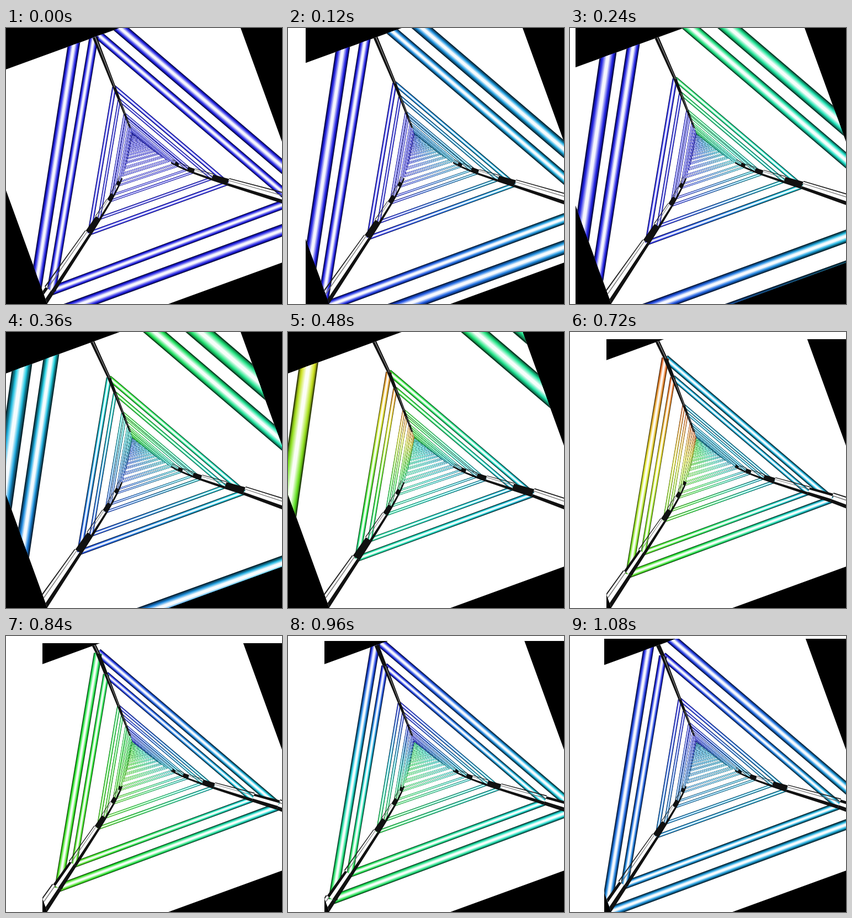
Recreate the animation shown at these times as an HTML page with a canvas. Size 500x500 px, loop 1.2 s.

```html
<!DOCTYPE html>
<html lang="en">
<head>
<meta charset="utf-8">
<title>Triangle tunnel</title>
<style>
html, body { margin: 0; width: 100%; height: 100%; overflow: hidden; background: #fff; }
canvas { display: block; }
</style>
</head>
<body>
<canvas id="stage" width="500" height="500"></canvas>
<script>
const ctx = document.getElementById('stage').getContext('2d');
const STEP = 120, STEPS = 10, PAIRS = 22;
const over = (w, limit) => Math.max(0, w - limit);
const clamp = (v, low, high) => Math.min(high, Math.max(low, v));
const mix = (a, b, t) => a + (b - a) * t;

// Corners as functions of the triangle's width; the far end bends up and left.
function bent(w, x, y) {
  const e = Math.exp(-w / 45);
  return [x - 26 * e, y - 64 * e];
}
const peak = w => bent(w, 246.7 - 0.202 * w - 0.06 * over(w, 430), 236.3 - 0.516 * w);
const right = w => bent(w, 247.3 + 0.617 * w, 234.8 + 0.187 * w + 0.05 * over(w, 430));
const left = w => bent(w, 247.3 - 0.383 * w, 228.4 + 0.575 * w);

// Each corner rests at blue and swings through the spectrum once or twice per loop.
function cornerHues(step) {
  const dip = (center, spread, depth) => 240 - depth * Math.exp(-(((step - center) / spread) ** 4));
  return {
    peakLeft: dip(5.1, 2, 230),
    left: dip(6.2, 2.6, 137),
    right: 182 + 58 * Math.cos(Math.PI * step / 5) ** 8,
    peakRight: dip(3.6, 2.4, 125)
  };
}

function tube(a, b, width, h1, h2) {
  const layer = (scale, factor, add) => {
    const paint = ctx.createLinearGradient(...a, ...b);
    for (let t = 0; t <= 1; t += 0.25) {
      const hue = mix(h1, h2, t);
      const light = 28 + Math.min(19, Math.abs(hue - 190) * 0.38);
      paint.addColorStop(t, `hsl(${hue}, 78%, ${light * factor + add}%)`);
    }
    ctx.strokeStyle = paint;
    ctx.lineWidth = width * scale;
    ctx.beginPath();
    ctx.moveTo(...a);
    ctx.lineTo(...b);
    ctx.stroke();
  };
  // Dark rim, full colour, then a highlight brightening towards the axis.
  layer(1, 0.3, 0);
  layer(0.86, 0.75, 0);
  for (let t = 0; t <= 1; t += 0.2) layer(mix(0.74, 0.2, t), 1 - t, 98 * t);
}

function triangle(w, hues) {
  const t = peak(w), r = right(w), l = left(w);
  const width = Math.max(1.8, 0.028 * w, 0.05 * w - 5);
  const lift = 0.17 * over(w, 385);
  tube(l, r, width, hues.left, hues.right);
  tube([t[0], t[1] - lift], [r[0], r[1] - lift], width, hues.peakRight, hues.right);
  tube(t, l, width, hues.peakLeft, hues.left);
}

// A tapering band along a corner's path, between two offsets from it.
function strip(corner, w1, w2, [nx, ny], from, to, color) {
  const at = (w, k) => {
    const [x, y] = corner(w), d = k * (w + 100);
    return [x + nx * d, y + ny * d];
  };
  ctx.fillStyle = color;
  ctx.beginPath();
  ctx.moveTo(...at(w1, from));
  ctx.lineTo(...at(w2, from));
  ctx.lineTo(...at(w2, to));
  ctx.lineTo(...at(w1, to));
  ctx.fill();
}

function rails(w1, w2, heavy) {
  const up = [0.95, 0.32];
  strip(peak, w1, w2, up, -0.01, 0.01, '#111');
  if (!heavy) strip(peak, w1, w2, up, 0.001, 0.004, '#aaa');
  for (const [corner, normal] of [[right, [0.33, -0.94]], [left, [-0.83, -0.55]]]) {
    const band = (from, to, color) => strip(corner, w1, w2, normal, from, to, color);
    if (heavy) {
      band(-0.012, 0.024, '#111');
      if (w1 > 280) band(0.002, 0.014, '#fff');
    } else {
      band(-0.012, 0.001, '#111');
      band(0.014, 0.017, '#777');
      band(0.024, 0.028, '#222');
    }
  }
}

function tunnel(pairs, hues) {
  let last = 90;
  for (const [inner, outer] of pairs) {
    triangle(inner, hues);
    triangle(outer, hues);
    if (inner < 90) continue;
    rails(last, inner, false);
    rails(inner, outer, true);
    last = outer;
  }
  if (last < 600) rails(last, 600, false);
}

// Widths of the inner and outer triangle of each pair, far to near.
function pairWidths(step) {
  const pairs = [];
  for (let k = PAIRS; k >= -1; k--) {
    const depth = 0.0049 + 0.00258 * (k - step / STEPS);
    if (depth < 0.0009) break;
    const gap = 0.0009 - 0.18 * Math.max(0, 0.0049 - depth);
    pairs.push([1 / depth, 1 / (depth - gap)]);
  }
  return pairs;
}

function draw(step) {
  const pairs = pairWidths(step);
  const nearest = pairs[pairs.length - 1][1];
  // The loop opens with the whole stage; later only the reach of the tubes is painted.
  const x = step ? Math.round(clamp(66 - 0.25 * (nearest - 460), 0, 66)) : 0;
  const y = step ? Math.round(clamp(13 - 0.11 * (nearest - 400), 0, 13)) : 0;

  ctx.fillStyle = '#fff';
  ctx.fillRect(0, 0, 500, 500);
  ctx.save();
  ctx.beginPath();
  ctx.rect(x, y, 500 - x, 500 - y);
  ctx.clip();
  ctx.fillStyle = '#000';
  ctx.fillRect(x, y, 500 - x, 500 - y);

  ctx.translate(250, 250);
  ctx.rotate(-Math.PI / 9);
  ctx.beginPath();
  ctx.rect(-250, -250, 500, 500);
  ctx.fillStyle = '#fff';
  ctx.fill();
  ctx.clip();
  ctx.rotate(Math.PI / 9);
  ctx.translate(-250, -250);
  tunnel(pairs, cornerHues(step));
  ctx.restore();
}

let shown = -1;
function tick() {
  const step = Math.floor(performance.now() / STEP) % STEPS;
  if (step !== shown) draw(shown = step);
  requestAnimationFrame(tick);
}
tick();
</script>
</body>
</html>
```
